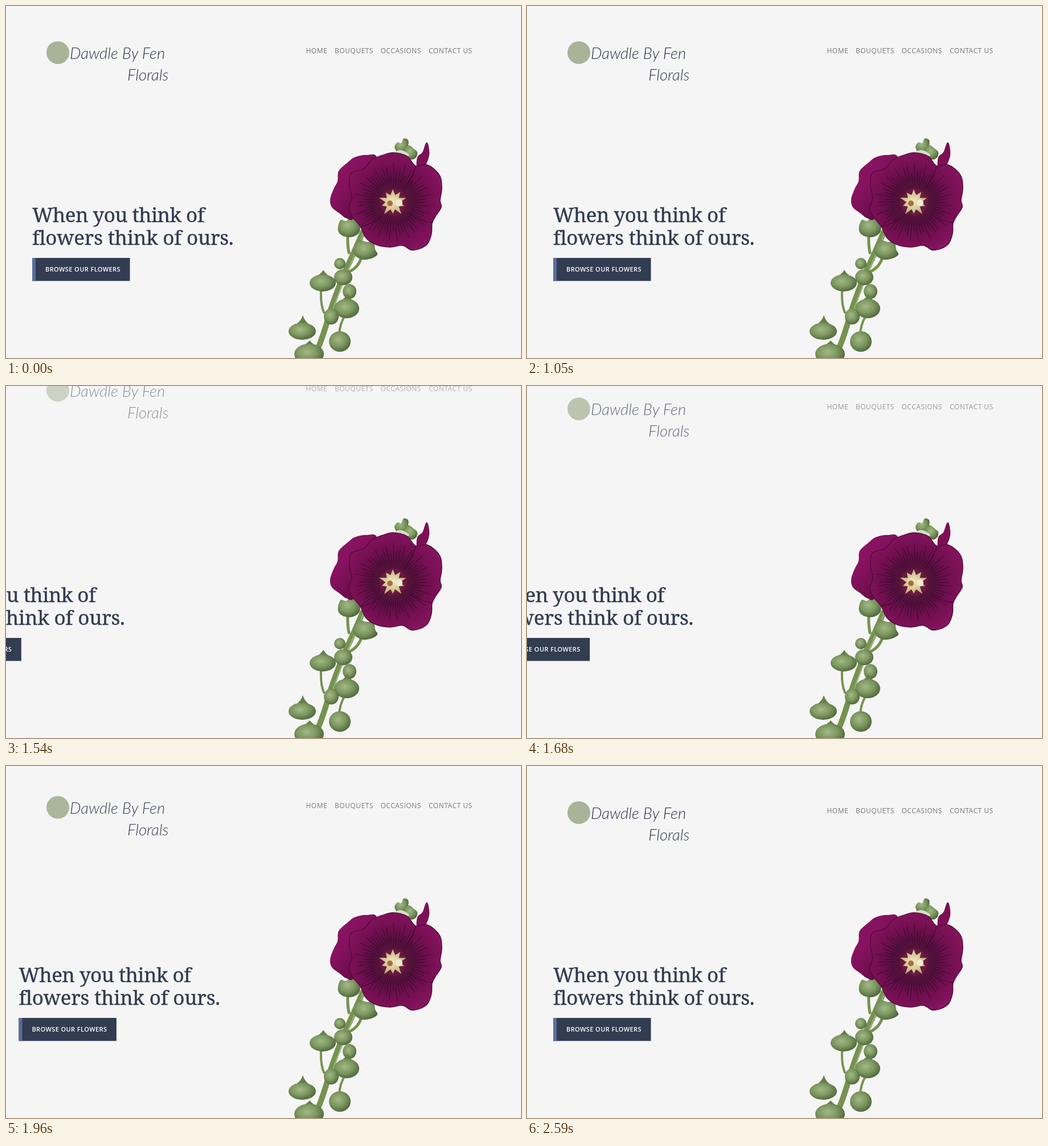
Write an HTML page that moves like this. It is 904 px wide and 619 px high and loops after 2660 ms.

```html
<!DOCTYPE html>
<html lang="en">
<head>
<meta charset="utf-8">
<title>Flower shop landing page</title>
<style>
  html, body { margin: 0; width: 100%; height: 100%; overflow: hidden; background: #f5f5f5; }
  svg { display: block; width: 904px; height: 619px; }
  .nav { font: 400 12px "Open Sans", sans-serif; letter-spacing: .5px; fill: #757575; }
  .brand { font: italic 300 27.5px Lato, sans-serif; fill: #30374a; }
  .title { font: 400 35px "Noto Serif", serif; fill: #323b50; stroke: #323b50; stroke-width: .4px; }
  .first { letter-spacing: -.56px; }
  .second { letter-spacing: -.2px; }
  .button { font: 600 11px "Open Sans", sans-serif; letter-spacing: .4px; fill: #fff; }
</style>
</head>
<body>
<svg viewBox="0 0 904 619" xmlns="http://www.w3.org/2000/svg">
  <defs>
    <radialGradient id="petal" gradientUnits="userSpaceOnUse" cx="680" cy="345" r="100">
      <stop offset=".15" stop-color="#6c1c40"/>
      <stop offset=".38" stop-color="#561040"/>
      <stop offset=".66" stop-color="#750f52"/>
      <stop offset="1" stop-color="#8a1663"/>
    </radialGradient>
    <linearGradient id="back" x1="0" y1="0" x2=".8" y2=".9">
      <stop offset="0" stop-color="#8a1566"/>
      <stop offset=".45" stop-color="#86125f"/>
      <stop offset="1" stop-color="#5c0a40"/>
    </linearGradient>
    <radialGradient id="bud" cx=".42" cy=".4" r=".68">
      <stop offset="0" stop-color="#a3b986"/>
      <stop offset=".5" stop-color="#7c975f"/>
      <stop offset="1" stop-color="#465d35"/>
    </radialGradient>
    <radialGradient id="eye">
      <stop offset="0" stop-color="#f2ecc4"/>
      <stop offset="1" stop-color="#c2b07a"/>
    </radialGradient>
  </defs>

  <g id="plant"></g>

  <g id="header">
    <circle cx="91" cy="82" r="20" fill="#a8b398"/>
    <text class="brand" x="112" y="93">Dawdle By Fen</text>
    <text class="brand" x="213" y="131">Florals</text>
    <g class="nav">
      <text x="526.5" y="83">HOME</text>
      <text x="577" y="83">BOUQUETS</text>
      <text x="657.5" y="83">OCCASIONS</text>
      <text x="742" y="83">CONTACT US</text>
    </g>
  </g>

  <g id="hero">
    <text class="title first" x="46" y="379.5">When you think of</text>
    <text class="title second" x="46" y="419.5">flowers think of ours.</text>
    <rect x="46" y="443" width="171.5" height="40.5" fill="#323d52"/>
    <rect x="46" y="443" width="6" height="40.5" fill="#5a6e99"/>
    <text class="button" x="69" y="467">BROWSE OUR FLOWERS</text>
  </g>
</svg>

<script>
const LOOP = 2660, STEP = 70;
const RELOAD = 1190, START = 1216, DURATION = 1062;
const HEADER_RISE = 156, HERO_SHIFT = 400;
const byId = id => document.getElementById(id);

// Closed Catmull-Rom curve through "x,y x,y ..." points.
function blob(points, fill, extra = '') {
  const p = points.split(' ').map(s => s.split(',').map(Number));
  const at = i => p[(i + p.length) % p.length];
  let d = `M${p[0]}`;
  for (let i = 0; i < p.length; i++) {
    const [a, b, c, e] = [at(i - 1), at(i), at(i + 1), at(i + 2)];
    const c1 = b.map((v, k) => v + (c[k] - a[k]) / 6);
    const c2 = c.map((v, k) => v - (e[k] - b[k]) / 6);
    d += `C${c1} ${c2} ${c}`;
  }
  return `<path d="${d}Z" fill="${fill}" ${extra}/>`;
}

const stem = (d, width, color = '#76924f') =>
  `<path d="${d}" fill="none" stroke="${color}" stroke-width="${width}" stroke-linecap="round"/>`;

// Round bud with an optional pointed tip of the given height.
function bud(x, y, rx, ry, tip = 0) {
  const point = tip &&
    `<path d="M${x - rx * .75} ${y - ry * .55}Q${x - 3} ${y - ry} ${x + 1} ${y - ry - tip}Q${x + 5} ${y - ry} ${x + rx * .75} ${y - ry * .55}Z" fill="#647f49"/>`;
  return (point || '') + `<ellipse cx="${x}" cy="${y}" rx="${rx}" ry="${ry}" fill="url(#bud)"/>`;
}

function veins() {
  let d = '';
  for (let i = 0; i < 60; i++) {
    const a = i / 60 * 2 * Math.PI;
    const far = 60 + 10 * Math.sin(i * 2.4);
    const dot = (r, turn) => `${(680 + r * Math.cos(a + turn)).toFixed(1)} ${(345 + r * Math.sin(a + turn)).toFixed(1)}`;
    d += `M${dot(24, 0)}Q${dot(42, .03)} ${dot(far, 0)}`;
  }
  return `<path d="${d}" fill="none" stroke="#2c0620" stroke-width="1.1" opacity=".55"/>`;
}

function eye() {
  let d = '';
  for (let i = 0; i < 20; i++) {
    const a = i * Math.PI / 10 - Math.PI / 2, r = i % 2 ? 13 : 23 + 3 * Math.sin(i * 1.7);
    d += `${i ? 'L' : 'M'}${(679 + r * Math.cos(a)).toFixed(1)} ${(345 + r * Math.sin(a)).toFixed(1)}`;
  }
  return `<path d="${d}Z" fill="url(#eye)"/>` +
    '<circle cx="674" cy="347" r="5" fill="#ab6d3d"/><circle cx="690" cy="346" r="6" fill="#f0ebcf"/>';
}

byId('plant').innerHTML = [
  stem('M626 398Q610 436 597 463Q580 503 568 540Q558 578 546 606', 10),
  stem('M629 396Q614 434 601 463Q584 503 572 540', 2, '#9db47c'),
  stem('M600 400Q599 420 602 434', 5),
  stem('M624 442Q618 462 598 469', 5),
  stem('M553 501Q552 525 558 539', 4),
  stem('M594 546Q586 560 585 576', 4),
  bud(592, 477, 16, 14),
  bud(603, 502, 12, 13),
  bud(586, 453, 10, 10),
  bud(556, 487, 23, 15, 8),
  bud(598, 532, 22, 17, 9),
  bud(571, 546, 13, 14),
  bud(520, 572, 24, 15, 13),
  bud(586, 590, 19, 18),
  bud(532, 612, 26, 18, 6),
  blob('583,387 588,376 597,378 606,371 613,376 621,384 620,398 608,406 593,405 584,398', 'url(#bud)'),
  blob('610,428 613,417 622,412 634,415 645,413 648,428 652,437 641,444 626,446 613,439', 'url(#bud)'),
  blob('682,248 687,240 694,241 698,233 706,236 705,248 697,258 687,257', 'url(#bud)'),
  blob('699,252 707,245 716,251 722,257 720,266 712,270 702,264', 'url(#bud)'),
  stem('M682 260Q692 251 705 262', 5, '#d6decb'),
  blob('721,284 722,266 731,257 737,241 741,243 743,262 736,281 727,288', '#7c1054'),
  blob('651,267 632,262 612,266 600,275 584,290 582,308 575,322 569,340 572,354 586,365 597,373 612,372 640,320', 'url(#back)'),
  blob('606,294 628,286 643,270 662,262 680,258 704,264 719,281 738,279 754,289 763,302 765,322 762,342 764,354 754,370 748,382 747,400 740,418 726,427 711,429 696,421 674,424 650,420 632,408 622,388 609,372 602,356 607,338 603,317',
    'url(#petal)', 'stroke="#520a39" stroke-width="1.3"'),
  stem('M719 283Q712 304 699 321', 1.5, '#480a33'),
  stem('M748 381Q726 379 707 364', 1.5, '#480a33'),
  stem('M622 388Q642 384 660 369', 1.5, '#480a33'),
  veins(),
  eye()
].join('');

// cubic-bezier(.25, .1, .25, 1)
function ease(x) {
  if (x <= 0) return 0;
  if (x >= 1) return 1;
  const curve = (u, a, b) => 3 * u * (1 - u) ** 2 * a + 3 * u * u * (1 - u) * b + u ** 3;
  let lo = 0, hi = 1;
  for (let i = 0; i < 30; i++) {
    const mid = (lo + hi) / 2;
    if (curve(mid, .25, .25) < x) lo = mid; else hi = mid;
  }
  return curve(lo, .1, 1);
}

function draw(now) {
  const t = Math.floor(now % LOOP / STEP) * STEP;
  const shown = t < RELOAD ? 1 : ease((t - START) / DURATION);
  const left = 1 - shown;
  byId('header').setAttribute('transform', `translate(0 ${-HEADER_RISE * left})`);
  byId('header').setAttribute('opacity', shown);
  byId('hero').setAttribute('transform', `translate(${-HERO_SHIFT * left} 0)`);
}

function tick() {
  draw(performance.now());
  requestAnimationFrame(tick);
}
tick();
</script>
</body>
</html>
```
